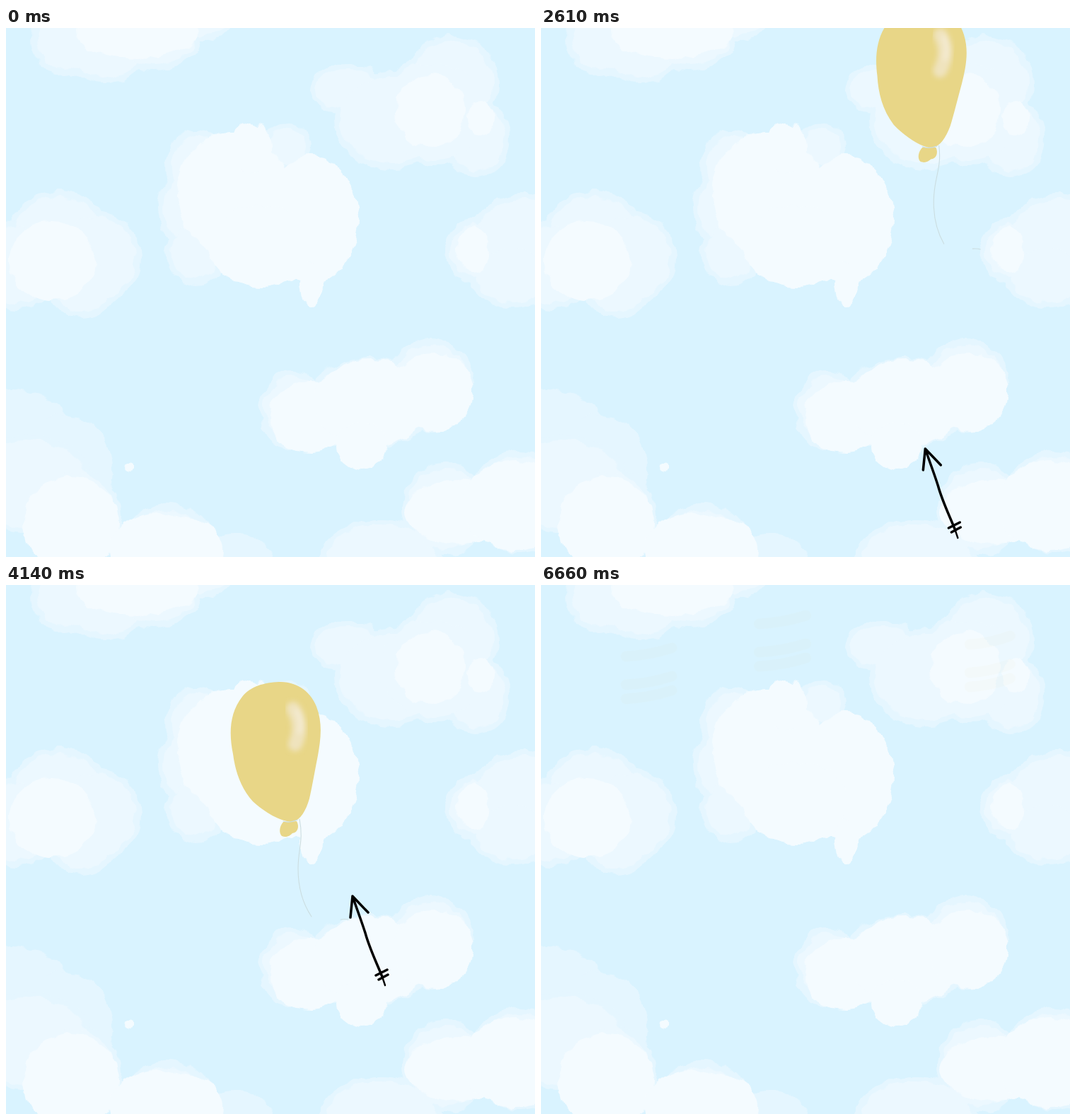
Write an HTML page that moves like this. It is 748 px wide and 748 px high and loops after 7.11 s.

```html
<!DOCTYPE html>
<html lang="en">
<head>
<meta charset="utf-8">
<title>Balloon and arrow</title>
<style>
  html, body { margin: 0; width: 100%; height: 100%; overflow: hidden; background: #d9f3ff; }
  svg { display: block; width: 100vw; height: 100vh; }
  .ink { fill: none; stroke: #000; stroke-width: 3.5; stroke-linecap: round; stroke-linejoin: round; }
  .thread { fill: none; stroke: #cbdde0; stroke-width: 1.1; stroke-linecap: round; }
</style>
</head>
<body>
<svg viewBox="0 0 748 748">
  <defs>
    <filter id="rough" filterUnits="userSpaceOnUse" x="-20" y="-20" width="788" height="788" color-interpolation-filters="sRGB">
      <feTurbulence type="fractalNoise" baseFrequency=".05" numOctaves="2" seed="4"/>
      <feDisplacementMap in="SourceGraphic" scale="14" xChannelSelector="R" yChannelSelector="G"/>
    </filter>
    <filter id="soft" x="-100%" y="-50%" width="300%" height="200%"><feGaussianBlur stdDeviation="3.5"/></filter>
    <radialGradient id="teal">
      <stop offset="0" stop-color="#6cc7bf"/>
      <stop offset=".6" stop-color="#7bcdc2"/>
      <stop offset=".85" stop-color="#a5dcc2" stop-opacity=".75"/>
      <stop offset="1" stop-color="#c9e8c8" stop-opacity="0"/>
    </radialGradient>
  </defs>
  <rect width="748" height="748" fill="#d9f3ff"/>
  <g id="clouds" filter="url(#rough)"></g>
  <g id="smears" fill="none" stroke="#e8d687" stroke-width="15" stroke-linecap="round" opacity=".035"></g>
  <g id="splash" filter="url(#rough)" fill="#e8d687"></g>
  <g id="drops" fill="url(#teal)"></g>

  <!-- the origin is the knot -->
  <g id="balloon">
    <path class="thread" d="M14-12C20 18 12 30 12 58C12 84 19 108 31 126M72 130q6-1 11 0"/>
    <path fill="#e8d687" d="M-9-8C-15-1-15 8-11 12C-4 15 1 11 4 8C12 7 14-2 10-9Z"/>
    <path fill="#e8d687" d="M-15-206C12-207 31-190 38-171C47-148 44-124 40-102C35-77 32-58 28-41C23-24 16-11 4-8C-12-8-36-22-52-37C-69-56-77-80-80-104C-86-133-85-162-67-185C-55-200-36-205-15-206Z"/>
    <path class="thread" d="M-9-9q8 3 20-2"/>
    <g filter="url(#soft)" fill="none" stroke-linecap="round">
      <path stroke="#efe3bd" stroke-width="20" d="M5-168Q20-145 8-118"/>
      <path stroke="#f4ebd2" stroke-width="7" d="M10-165Q18-150 14-136"/>
    </g>
  </g>

  <!-- the origin is the tip -->
  <g id="arrow" class="ink">
    <path d="M-3 30L0 0L22 23M0 0C6 18 13 36 18 52C24 74 34 94 42 114M33 112L49 104M37 118L50 111"/>
    <path stroke-width="2.4" d="M42 114L46 126"/>
  </g>
</svg>
<script>
const TICK = 90, TICKS = 79, ENTER = 12, SWAY = 33, POP = 60, FALL = 64, CLEAR = 74;
const $ = id => document.getElementById(id);

function add(parent, tag, attrs) {
  const el = document.createElementNS('http://www.w3.org/2000/svg', tag);
  for (const k in attrs) el.setAttribute(k, attrs[k]);
  return parent.appendChild(el);
}

function puffs(list, fill, inset = 0) {
  for (const [cx, cy, rx, ry] of list) {
    const size = { rx: Math.max(0, rx - inset), ry: Math.max(0, ry - inset) };
    add($('clouds'), 'ellipse', { cx, cy, ...size, fill });
  }
}

// Each puff is x, y, rx, ry; the middle tone is the outer shape drawn smaller
function cloud(outer, core, inset = 8) {
  puffs(outer, '#e5f6ff');
  puffs(outer, '#ecf8ff', inset);
  puffs(core, '#f4fbff');
}

cloud([[85, 15, 50, 52], [140, 25, 60, 53], [210, 10, 65, 50], [280, 0, 38, 18]], [[185, 5, 86, 38]]);
cloud([[630, 80, 66, 70], [482, 86, 54, 36], [665, 155, 48, 56], [545, 130, 82, 70], [605, 118, 85, 76]],
      [[600, 118, 49, 52], [672, 128, 20, 25]]);
cloud([[268, 198, 42, 54], [398, 168, 36, 34], [250, 255, 36, 50], [268, 318, 42, 46]],
      [[320, 235, 78, 88], [345, 170, 30, 36], [432, 270, 66, 90], [360, 308, 72, 58], [432, 362, 17, 30]]);
cloud([[75, 300, 73, 70], [15, 335, 65, 63], [125, 325, 66, 67], [108, 365, 48, 45]], [[65, 329, 60, 57]]);
cloud([[735, 300, 80, 66], [660, 315, 39, 46], [715, 350, 60, 46]], [[660, 313, 23, 33]]);
cloud([[405, 540, 47, 56], [600, 505, 61, 66], [515, 530, 90, 64]],
      [[430, 550, 58, 50], [515, 530, 80, 62], [605, 515, 56, 55], [503, 590, 36, 34]]);
cloud([[10, 600, 95, 90], [85, 625, 67, 78], [325, 765, 58, 52]], [], 99);
cloud([[30, 645, 95, 70], [100, 690, 64, 70], [230, 725, 62, 52]],
      [[92, 700, 68, 66], [225, 740, 82, 54], [174, 620, 8, 5]]);
cloud([[530, 760, 88, 66], [622, 680, 62, 66], [725, 670, 72, 72]],
      [[640, 685, 76, 46], [720, 675, 75, 64]]);

// x, y, rx, ry, strength
const spots = [
  [418, 323, 150, 168, 1], [155, 137, 50, 52, 1], [344, 91, 51, 50, 1], [637, 120, 44, 45, .85],
  [210, 341, 46, 48, .55], [622, 353, 59, 51, .55], [280, 474, 36, 33, .2], [385, 577, 56, 62, .65]
].map(([x, y, rx, ry, k]) => ({ x, y, rx, k, el: add($('splash'), 'ellipse', { rx, ry }) }));

for (const { x, y, rx } of spots.slice(1, 4))
  for (const dy of [-36, 4, 24])
    add($('smears'), 'path', { d: `M${x - rx * .7} ${y + dy}q${rx * .7} -2 ${rx * 1.3} -12` });

const drops = [[414, 256, 18], [384, 320, 17], [441, 301, 14]]
  .map(([cx, cy, r]) => ({ cy, el: add($('drops'), 'circle', { cx, cy, r }) }));

// tick, x, y, tilt
const floatKeys = [
  [12, -55, 1010, 12], [19, -50, 810, 14], [24, 27, 520, 15], [27, 219, 265, 16],
  [30, 640, 170, 0], [33, 296, 324, 9], [46, 401, 343, 0], [59, 417, 350, 0]];
const flyKeys = [[12, 600, 748], [24, 560, 640], [33, 530, 559], [46, 490, 440], [59, 442, 325]];

// Value of the keys at tick n: straight, or with tangents from the neighbours
function track(keys, n, smooth) {
  let i = 0;
  while (i < keys.length - 2 && n >= keys[i + 1][0]) i++;
  const a = keys[i], b = keys[i + 1], p = keys[i - 1] || a, q = keys[i + 2] || b;
  const span = b[0] - a[0], u = (n - a[0]) / span;
  return a.slice(1).map((v, j) => {
    const k = j + 1, d = b[k] - v;
    if (!smooth) return v + d * u;
    const m0 = (b[k] - p[k]) / (b[0] - p[0]) * span, m1 = (q[k] - v) / (q[0] - a[0]) * span;
    return v + u * (m0 + u * (3 * d - 2 * m0 - m1 + u * (m0 + m1 - 2 * d)));
  });
}

// A swing of 13 ticks that dies away
function sway(n) {
  const age = Math.max(0, n - SWAY);
  return Math.sin(age / 13 * 2 * Math.PI) * Math.exp(-age / 10);
}

const show = (id, on) => { $(id).style.display = on ? '' : 'none'; };

function draw(n) {
  const flying = n >= ENTER && n < POP, popped = n >= POP && n < CLEAR;
  show('balloon', flying);
  show('arrow', flying);
  show('splash', popped);
  show('drops', popped && n >= FALL);
  show('smears', n >= CLEAR);

  if (flying) {
    const [x, y, tilt] = track(floatKeys, n, true), s = sway(n);
    $('balloon').setAttribute('transform', `translate(${x + 80 * s} ${y - 130 * s}) rotate(${tilt - 6 * s})`);
    $('arrow').setAttribute('transform', `translate(${track(flyKeys, n)})`);
  }
  if (popped) {
    const age = n - POP, grow = Math.min(1, .5 + age * .25);
    const fade = age < 8 ? 1 - .0875 * age : .3 - .05 * (age - 8);
    const from = (v, centre) => centre + (v - centre) * grow;
    for (const { x, y, k, el } of spots) {
      el.setAttribute('transform', `translate(${from(x, 415)} ${from(y, 300)}) scale(${grow})`);
      el.setAttribute('opacity', fade * k);
    }
    // gravity: the drops gather speed from the middle of the burst
    const sunk = 6.2 * ((n - FALL) ** 2 - 16);
    for (const { cy, el } of drops) el.setAttribute('cy', cy + sunk);
  }
}

const start = performance.now();
let last = -1;
function loop() {
  const n = Math.floor((performance.now() - start) / TICK) % TICKS;
  if (n !== last) draw(last = n);
  requestAnimationFrame(loop);
}
loop();
</script>
</body>
</html>
```
